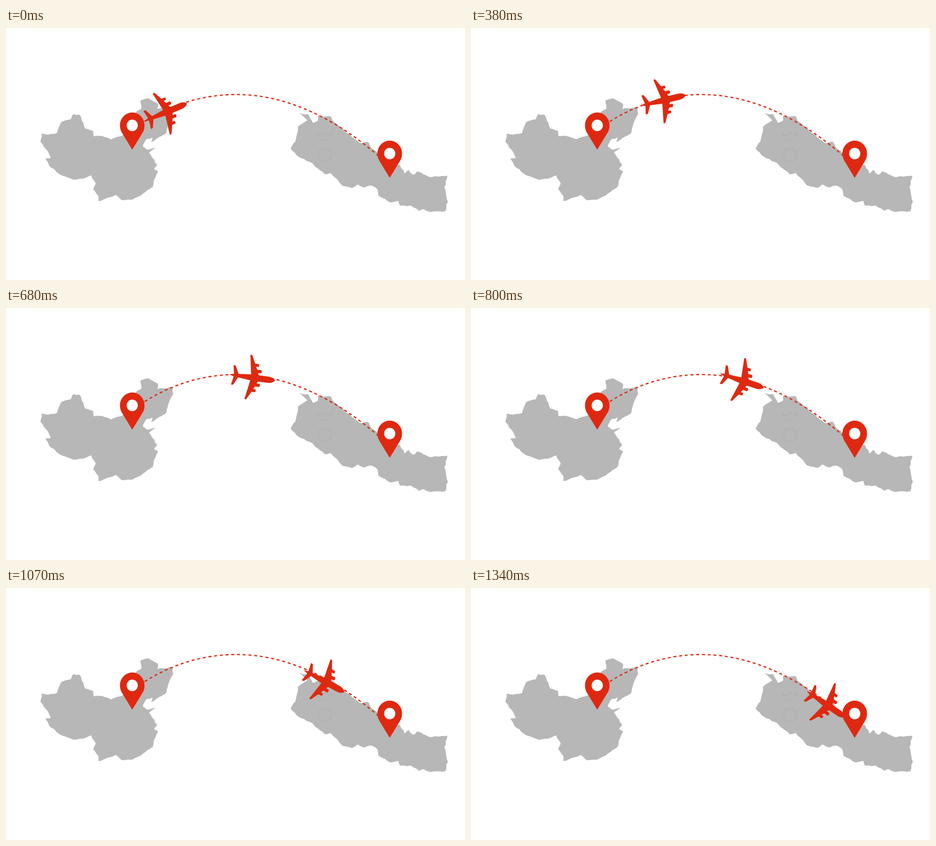
An HTML page with a canvas that plays this animation: 1009x555 px, repeating every 1.67 s.

```html
<!DOCTYPE html>
<html lang="en">
<head>
<meta charset="utf-8">
<title>Flight</title>
<style>
  html, body { margin: 0; width: 100%; height: 100%; overflow: hidden; background: #fff; }
  canvas { display: block; }
</style>
</head>
<body>
<canvas id="stage" width="1009" height="555"></canvas>
<script>
const ctx = document.getElementById('stage').getContext('2d');
const RED = '#de2910', GRAY = '#b7b7b7', FAINT = '#aaaaaa';
const LOOP = 1670, HOLD = 200, STEP = 30, LAST = 39;

// Main corners of each land; the fine coastline is generated
const WEST = `148,190 161,191 170,209 174,221 191,227 193,238 211,238 231,245 257,236 285,186
  297,178 296,160 312,155 334,167 333,178 366,175 367,190 357,211 352,231 337,240 320,251 322,242
  309,245 301,260 311,268 328,264 315,274 332,301 326,311 334,316 325,336 322,350 296,369 277,378
  255,379 241,368 218,376 204,381 203,370 192,355 197,342 187,325 168,332 148,334 121,324 95,303
  87,288 98,286 89,268 76,251 79,233 92,235 112,231 122,207 142,201`;
const EAST = `645,187 664,190 675,209 686,203 686,193 714,195 718,204 750,231 778,253 796,251
  803,264 850,302 866,302 876,320 885,313 895,323 904,316 931,328 970,326 964,350 971,383 966,403
  933,405 917,399 908,402 889,391 867,391 862,381 846,384 819,369 816,355 803,347 788,351 773,345
  761,352 738,346 714,320 701,322 685,309 668,295 643,283 626,265 636,250 642,218 662,203`;

function random(seed) {
  return () => (seed = seed * 16807 % 2147483647) / 2147483647;
}

// Smooth closed curve through the corners, with small seeded bays between them
function coast(corners, rough, seed) {
  const rnd = random(seed), pts = [];
  const base = corners.trim().split(/\s+/).map(p => p.split(',').map(Number));
  base.forEach(([x, y], i) => {
    const [x2, y2] = base[(i + 1) % base.length];
    const len = Math.hypot(x2 - x, y2 - y), n = Math.max(1, Math.round(len / 7));
    for (let j = 0; j < n; j++) {
      const u = j / n, off = j ? (rnd() * 2 - 1) * rough : 0;
      pts.push([x + (x2 - x) * u + (y2 - y) / len * off, y + (y2 - y) * u - (x2 - x) / len * off]);
    }
  });
  const n = pts.length, at = i => pts[(i + n) % n], path = new Path2D(), k = 0.15;
  path.moveTo(...pts[0]);
  for (let i = 0; i < n; i++) {
    const [a, b, c, d] = [at(i - 1), at(i), at(i + 1), at(i + 2)];
    path.bezierCurveTo(
      b[0] + (c[0] - a[0]) * k, b[1] + (c[1] - a[1]) * k,
      c[0] - (d[0] - b[0]) * k, c[1] - (d[1] - b[1]) * k, c[0], c[1]);
  }
  path.closePath();
  return path;
}

const west = coast(WEST, 1, 7);
const east = coast(EAST, 1.3, 23);
const route = new Path2D('M305 206C367 167 435 146.5 507 146.5C625 146.5 735 208 820 283');
const pinBody = new Path2D('M0 54L-22.5 17C-25.5 12 -27 7 -27 0A27 28 0 0 1 27 0C27 7 25.5 12 22.5 17Z');
const moon = new Path2D('M685 231Q686 247 701 247Q716 247 717 231Q714 237 710 237' +
  'A10 10 0 0 0 692 237Q688 237 685 231');
const halfPlane = new Path2D('M58.8 1Q58.6 -2 54.5 -4.2Q50 -6.8 45 -6.9L22.4 -6.9L19.8 -11.3' +
  'L26 -11.8Q28 -12.5 27.4 -16Q27 -18.8 25.5 -18.8L17.5 -18.4L14 -24.6L18.8 -25Q20.4 -25.6 20 -28.5' +
  'Q19.8 -31 18.4 -31L11.2 -31.2L2 -49Q0 -49.9 -2.1 -49L5.1 -6.6L-22.2 -3.8L-30.7 -20.9' +
  'Q-33 -22 -35.7 -21.2L-32.2 -3L-40.7 0L-40.7 1Z');

const sun = new Path2D();
for (let i = 0; i < 24; i++) {
  const a = i * Math.PI / 12, r = i % 2 ? 12.5 : 17.5;
  sun.lineTo(701 + r * Math.sin(a), 279.5 - r * Math.cos(a));
}
sun.closePath();

// step, x, y, heading in degrees
const keys = [
  [0, 343, 188.5, -22.6], [3, 374, 172.5, -18.6], [12, 467.5, 152, -5.2],
  [21, 587.5, 157, 18.2], [26, 653, 179.5, 25.3], [39, 773, 250.5, 34.5]
];

function slope(i, c) {
  const a = keys[Math.max(i - 1, 0)], b = keys[Math.min(i + 1, keys.length - 1)];
  return (b[c] - a[c]) / (b[0] - a[0]);
}

// Cubic Hermite interpolation of column c
function pose(step, c) {
  let i = 0;
  while (i < keys.length - 2 && step > keys[i + 1][0]) i++;
  const a = keys[i], b = keys[i + 1], h = b[0] - a[0], u = (step - a[0]) / h, v = 1 - u;
  return a[c] * v * v * (1 + 2 * u) + b[c] * u * u * (3 - 2 * u) +
    h * u * v * (slope(i, c) * v - slope(i + 1, c) * u);
}

function drawPlane(step) {
  ctx.save();
  ctx.translate(pose(step, 1), pose(step, 2));
  ctx.rotate(pose(step, 3) * Math.PI / 180);
  ctx.translate(0, 0.4);
  ctx.fillStyle = RED;
  ctx.fill(halfPlane);
  ctx.scale(1, -1);
  ctx.fill(halfPlane);
  ctx.restore();
}

function drawPin(x, y) {
  ctx.save();
  ctx.translate(x, y);
  ctx.fillStyle = RED;
  ctx.fill(pinBody);
  ctx.fillStyle = '#fff';
  ctx.beginPath();
  ctx.ellipse(0, 0.5, 12.3, 12.8, 0, 0, Math.PI * 2);
  ctx.fill();
  ctx.restore();
}

function line(path, color, width, dash) {
  ctx.strokeStyle = color;
  ctx.lineWidth = width;
  ctx.setLineDash(dash);
  ctx.stroke(path);
}

function draw(now) {
  const t = now % LOOP;
  const step = t < HOLD ? 0 : Math.min(LAST, Math.floor((t - HOLD) / STEP) + 1);
  ctx.fillStyle = '#fff';
  ctx.fillRect(0, 0, 1009, 555);
  ctx.fillStyle = GRAY;
  ctx.fill(west);
  ctx.fill(east);
  line(moon, FAINT, 0.8, []);
  line(sun, FAINT, 0.8, []);
  line(route, RED, 2.7, [6.5, 6.1]);
  drawPlane(step);
  drawPin(277.5, 214);
  drawPin(843.5, 276);
}

const start = performance.now();
function tick() {
  draw(performance.now() - start);
  requestAnimationFrame(tick);
}
tick();
</script>
</body>
</html>
```
